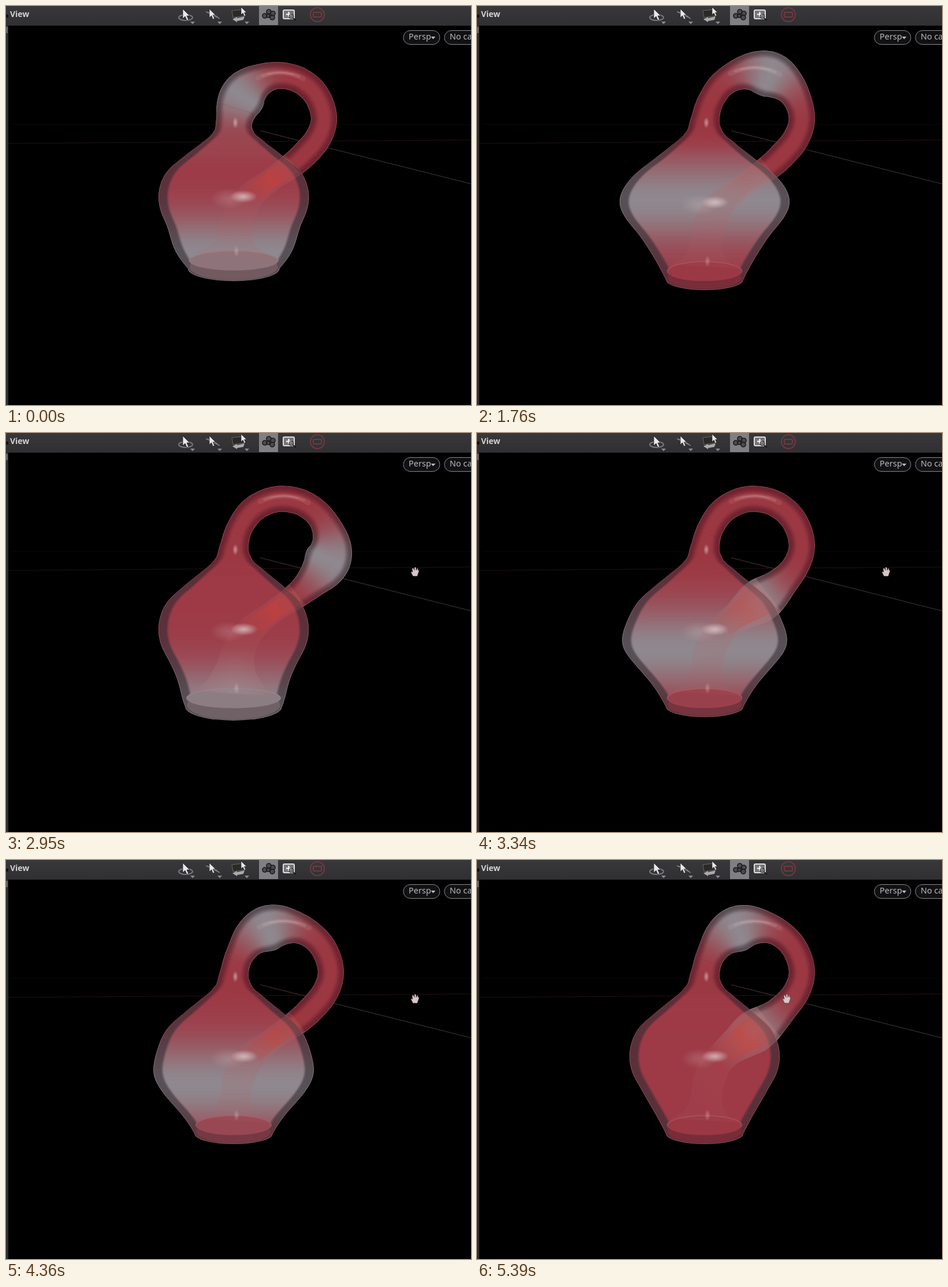
Animation of 805 by 691 pixels, one loop 5.42 s. Source, as an HTML page with a canvas:

```html
<!DOCTYPE html>
<html lang="en">
<head>
<meta charset="utf-8">
<title>Pulsing Klein bottle</title>
<style>
html, body { margin: 0; width: 100%; height: 100%; overflow: hidden; background: #000; }
canvas, svg { position: absolute; left: 0; top: 0; }
text { font-family: "Noto Sans", "Open Sans", sans-serif; font-size: 14.5px; fill: #b9b9bd; }
</style>
</head>
<body>
<canvas id="scene" width="805" height="691"></canvas>
<svg width="805" height="691">
  <defs>
    <linearGradient id="bar" x2="0" y2="1"><stop stop-color="#38383b"/><stop offset="1" stop-color="#303033"/></linearGradient>
    <path id="arrow" d="M0 0V17L4 13L7 20L10 18.500L7 12H12Z" fill="#e8e8ea" stroke="#222" stroke-width=".8"/>
    <path id="drop" d="M-4 0H4L0 4.500Z" fill="#8b8b8f"/>
  </defs>
  <rect width="805" height="34" fill="url(#bar)"/>
  <path d="M0 34H4V691H0Z" fill="#2d2e30"/>
  <path d="M0 36H3V47H0Z" fill="#66666a"/>
  <path d="M0 15H4V20H0Z" fill="#111"/>
  <text x="7" y="19" font-weight="bold" style="font-size:14px;fill:#d2d2d4">View</text>

  <ellipse cx="311" cy="20" rx="12" ry="5" fill="none" stroke="#77777c" stroke-width="2"/>
  <path d="M346 10Q358 11 370 22L360 17Z" fill="#77777c" stroke="#8a8a8e"/>
  <path d="M391 8L410 6L413 17L393 20Z" fill="#2b2928" stroke="#6b6562"/>
  <path d="M392 23L400 19V21L413 18L411 24L400 26V28Z" fill="#aaaaad"/>
  <use href="#arrow" x="306" y="5"/>
  <use href="#arrow" transform="translate(352 5) scale(.9)"/>
  <use href="#arrow" transform="translate(407 2) scale(.78)"/>
  <use href="#drop" x="323" y="27"/><use href="#drop" x="370" y="27"/><use href="#drop" x="417" y="27"/>

  <path d="M438 0H471V33H438Z" fill="#808084"/>
  <g fill="#4b4b4e" stroke="#18181a" stroke-width="1.600">
    <circle cx="448" cy="17" r="4"/><circle cx="455" cy="10" r="4"/><circle cx="462" cy="13" r="4"/>
    <circle cx="461" cy="20" r="4"/><circle cx="454" cy="17" r="3"/>
  </g>
  <rect x="480" y="7" width="19" height="15" rx="2" fill="#77777a" stroke="#dedee0" stroke-width="2"/>
  <path d="M489.500 10V19M485 14.500H494" stroke="#fff" stroke-width="2"/>
  <circle cx="494" cy="18" r="4" fill="none" stroke="#222"/><path d="M497 21L502 25" stroke="#18181a" stroke-width="2"/>
  <g fill="none" stroke="#72393f" stroke-width="2"><circle cx="539" cy="15" r="12"/><rect x="532" y="11" width="14" height="8" rx="1"/></g>

  <g fill="#111114" stroke="#8a8a8d"><rect x="688" y="42.500" width="63" height="24" rx="12"/><rect x="759" y="42.500" width="80" height="24" rx="12"/></g>
  <text x="697" y="58">Persp</text><text x="768" y="58">No ca</text>
  <path d="M735.500 53H743.500L739.500 57.500Z" fill="#b9b9bd"/>
  <path id="hand" d="M-4 7L-7 1Q-7 -1 -4 1L-5 -5Q-4 -7 -2 -5L-1 -2V-7Q1 -9 2 -6V-2L4 -6Q6 -6 5 -2L6 -3Q8 -2 6 2L4 8H-3Z" fill="#d8c7c8" stroke="#352b2d" stroke-width=".6"/>
</svg>
<script>
const ctx = document.getElementById('scene').getContext('2d');
const hand = document.getElementById('hand');
const DURATION = 5420, LOOP = 860, GAP = 296, BULGE = 17, CX = 394;

// Centre line with radius: up the body, round the handle, back down inside.
const knots = [
  [CX,474,67], [CX,462,73], [CX,440,85], [CX,400,108], [CX,368,125], [CX,340,130],
  [CX,312,125], [CX,288,111], [CX,262,82], [CX,240,55], [CX,220,33], [395,198,25],
  ...[200, 225, 248, 270, 295, 320, 344, 365].map(a => {
    a *= Math.PI / 180;
    return [480 + 82 * Math.cos(a), 196 + 82 * Math.sin(a), 22.5];
  }),
  [550,233,23], [527,260,23], [502,282,22], [462,310,20], [425,340,24],
  [404,374,27], [397,410,27], [395,436,36], [CX,452,60]
];

const clamp = v => Math.max(0, Math.min(1, v));
const lerp = (a, b, k) => a + (b - a) * k;
const smooth = (a, b, v) => { const k = clamp((v - a) / (b - a)); return k * k * (3 - 2 * k); };
const rgb = hex => [16, 8, 0].map(b => hex >> b & 255);
const mix = (a, b, k) => a.map((v, i) => lerp(v, b[i], k));
const css = (c, alpha = 1) => `rgba(${c.map(Math.round)},${alpha})`;
const spline = (a, b, c, d, t) =>
  .5 * (2 * b + (c - a) * t + (2 * a - 5 * b + 4 * c - d) * t * t + (3 * b - a - 3 * c + d) * t ** 3);

function track(keys, t) {
  let i = 1;
  while (i < keys.length - 1 && t > keys[i][0]) i++;
  const [t0, a] = keys[i - 1], [t1, b] = keys[i];
  return lerp(a, b, clamp((t - t0) / (t1 - t0)));
}

const spine = [];
for (let i = 0; i < knots.length - 1; i++) {
  const four = [-1, 0, 1, 2].map(o => knots[Math.max(0, Math.min(knots.length - 1, i + o))]);
  for (let j = 0; j < 12; j++) {
    const [x, y, r] = [0, 1, 2].map(k => spline(...four.map(p => p[k]), j / 12));
    spine.push({ x, y, r, home: [x, y] });
  }
}
spine.forEach((p, i) => {
  const a = spine[Math.max(0, i - 1)], b = spine[Math.min(spine.length - 1, i + 1)];
  const len = Math.hypot(b.x - a.x, b.y - a.y);
  p.nx = (b.y - a.y) / len;
  p.ny = (a.x - b.x) / len;
  p.s = i ? a.s + Math.hypot(p.x - a.x, p.y - a.y) : 0;
});

const red = { edge: rgb(0x8a4a53), tubeRim: rgb(0x6f2430), bodyRim: rgb(0x5a303b), tube: rgb(0x9b3842), body: rgb(0x9d3a46), band: rgb(0x782c38) };
const grey = { edge: rgb(0x7b787e), rim: rgb(0x575257), core: rgb(0x8e8c92), band: rgb(0x706469) };

// The centre line grows about the neck; its radii keep their width.
let pulses = [], size = 1;
const at = (x, y) => [397 + (x - 397) * size, 202 + (y - 202) * size];

function near(s, sigma) {
  return Math.max(...pulses.map(p => {
    const d = ((s - p + LOOP / 2) % LOOP + LOOP) % LOOP - LOOP / 2;
    return Math.exp(-d * d / (2 * sigma * sigma));
  }));
}
const girth = p => clamp((p.r - 25) / 55);
const radius = p => p.r + BULGE * near(p.s, 33);
const tint = p => .95 * near(p.s, lerp(37, 52, girth(p)));

function outline(points, half) {
  const side = k => points.map(p => [p.x + k * p.nx * half(p), p.y + k * p.ny * half(p)]);
  ctx.beginPath();
  [...side(1), ...side(-1).reverse()].forEach(q => ctx.lineTo(...q));
  ctx.closePath();
}

function shade(p, u) {
  const k = girth(p), w = tint(p);
  if (!u) return mix(red.edge, grey.edge, w);
  const rim = mix(mix(red.tubeRim, red.bodyRim, k), grey.rim, w);
  const core = mix(mix(red.tube, red.body, k), grey.core, w);
  return mix(rim, core, smooth(lerp(.15, .65, k), 1, u));
}

// Nested strips, dark at the silhouette and bright in the middle.
function shell(from, to) {
  for (const u of [0, .06, .25, .4, .55, .7, .8, .9, 1]) {
    for (let i = 0; i < spine.length - 2; i++) {
      const p = spine[i];
      if (p.s < Math.max(from, u > .1 ? 13 : 0) || p.s > to) continue;
      ctx.fillStyle = css(shade(p, u));
      outline(spine.slice(i, i + 3), q => radius(q) - u * lerp(15, 18, girth(q)));
      ctx.fill();
    }
  }
}

function oval(y, rx, ry, color) {
  ctx.fillStyle = css(color);
  ctx.beginPath();
  ctx.ellipse(...at(CX, y), rx, ry, 0, 0, 7);
  ctx.fill();
}

function glow([x, y], rx, ry, alpha, color = [225, 205, 207]) {
  ctx.save();
  ctx.translate(x, y);
  ctx.scale(rx, ry);
  const g = ctx.createRadialGradient(0, 0, 0, 0, 0, 1);
  g.addColorStop(0, css(color, alpha));
  g.addColorStop(.4, css(color, alpha * .65));
  g.addColorStop(1, css(color, 0));
  ctx.fillStyle = g;
  ctx.fillRect(-1, -1, 2, 2);
  ctx.restore();
}

function line(x0, y0, x1, y1, color, width = 1) {
  ctx.strokeStyle = color;
  ctx.lineWidth = width;
  ctx.beginPath();
  ctx.moveTo(x0, y0);
  ctx.lineTo(x1, y1);
  ctx.stroke();
}

function baseShadow() {
  const r = radius(spine[0]), drop = 6 * near(0, 30);
  oval(474, r, 18 + drop, shade(spine[0], 0));
  oval(473.5, r - 1, 17.5 + drop, shade(spine[0], .06));
}

function baseFloor() {
  const w = tint(spine[0]), r = radius(spine[0]), drop = 6 * near(0, 30);
  oval(471, r - 3, 19 + drop, mix(red.band, grey.band, w));
  oval(459, r - 2, 17, mix(rgb(0xa9525c), grey.core, w));
  oval(460, r - 3, 16.5, mix(rgb(0x9a3844), rgb(0x8b8186), w));
}

function innerTube() {
  const tube = spine.filter(p => p.s > 640);
  const g = ctx.createLinearGradient(...at(500, 285), ...at(395, 440));
  g.addColorStop(0, 'rgba(205,110,108,.2)');
  g.addColorStop(.5, 'rgba(185,90,92,.18)');
  g.addColorStop(1, 'rgba(175,95,102,.12)');
  ctx.save();
  outline(tube, radius);
  ctx.fillStyle = g;
  ctx.fill();
  ctx.clip();
  for (const pulse of pulses) {
    const s = pulse % LOOP;
    if (s < 590) continue;
    const p = tube.find(q => q.s >= s) || tube[tube.length - 1];
    glow([p.x, p.y], 78, 78, .38, [165, 150, 155]);
  }
  ctx.restore();

  const calm = 1 - near(175, 52);
  const hot = ctx.createLinearGradient(...at(500, 285), ...at(412, 348));
  hot.addColorStop(0, `rgba(210,65,52,${.1 * calm})`);
  hot.addColorStop(.4, `rgba(215,62,46,${.45 * calm})`);
  hot.addColorStop(1, 'rgba(190,60,55,0)');
  outline(tube.filter(p => p.s < 740), p => radius(p) * .72);
  ctx.fillStyle = hot;
  ctx.fill();
}

function highlights() {
  glow(at(385, 344), 32, 18, .22);
  glow(at(412, 340), 24, 11, .75);
  glow(at(397, 202), 5, 10, .6);
  glow(at(399, 442), 5, 10, .35);
  ctx.lineCap = 'round';
  for (const [width, alpha, spread] of [[9, .1, .5], [5, .14, .4], [2, .2, .28]]) {
    ctx.strokeStyle = css([230, 195, 197], alpha);
    ctx.lineWidth = width;
    ctx.beginPath();
    ctx.arc(...at(480, 196), 82 * size + 5 + 4 * near(400, 30), -1.55 - spread, -1.55 + spread);
    ctx.stroke();
  }
  ctx.lineCap = 'butt';
}

function draw(t) {
  const travel = track([[380, 26], [1490, 92], [1760, 136], [2260, 391], [2950, 559], [3740, 767], [4890, 1094], [5390, 1237]], t);
  pulses = [travel % LOOP, (travel + GAP) % LOOP];
  size = track([[150, .928], [910, .96], [1490, 1]], t);
  for (const p of spine) [p.x, p.y] = at(...p.home);

  ctx.fillStyle = '#000';
  ctx.fillRect(0, 0, 805, 691);
  line(10, 205, 805, 205, '#0d0a0b');
  line(4, 238, 805, 232, '#261114');
  line(440, 216, 805, 308, '#29282a', 1.6);
  line(440, 216, 505, 233, '#35171b');

  shell(285, 655);
  baseShadow();
  shell(0, 295);
  baseFloor();
  innerTube();
  highlights();

  const x = track([[2060, 755], [2200, 708], [5150, 708], [5380, 536]], t);
  hand.setAttribute('transform', `translate(${x} 240)`);
  hand.setAttribute('visibility', t < 2060 ? 'hidden' : 'visible');
}

const start = performance.now();
function tick() {
  draw((performance.now() - start) % DURATION);
  requestAnimationFrame(tick);
}
tick();
</script>
</body>
</html>
```
